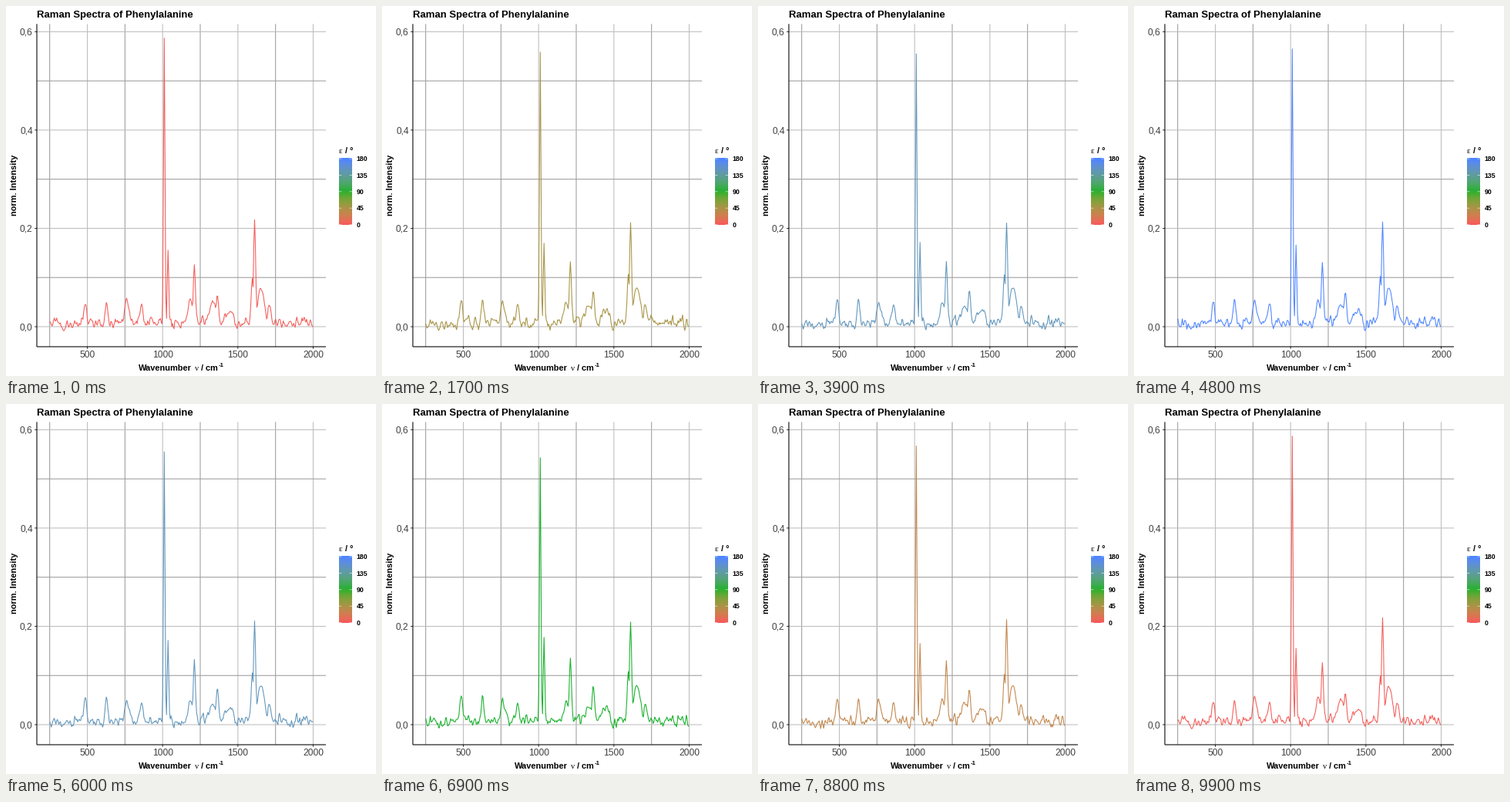
Write a matplotlib script that moves like this. It is 480 by 480 pixels and loops after 10 s.

```python
import numpy as np
import matplotlib.pyplot as plt
from matplotlib.animation import FuncAnimation

plt.rcParams["font.family"] = "Liberation Sans"

SIZE, DPI = 480, 72          # at 72 dpi one point is one pixel
FRAMES, INTERVAL = 100, 100
ANGLES = [0, 30, 45, 60, 90, 120, 150, 180]
LEFT, RIGHT, TOP, BOTTOM = 40, 415, 23.3, 442

# Main Raman bands: centre, width (1/cm), height at 90°, change towards 0°
BANDS = [
    (486, 9, .055, -.018),
    (628, 7, .058, -.010),
    (761, 15, .042, .008),
    (861, 9, .045, .004),
    (1011, 4.8, .543, .044),
    (1036, 5, .177, -.023),
    (1186, 16, .042, .006),
    (1211, 7, .134, -.009),
    (1335, 26, .036, .012),
    (1363, 9, .074, -.012),
    (1445, 24, .033, -.004),
    (1596, 8, .108, -.011),
    (1611, 7, .208, .009),
    (1652, 22, .080, -.004),
    (1708, 12, .032, .004),
]

# Colour scale, blended in Lab space
STOPS = ["#F35E5A", "#17B12B", "#5086FF"]
TO_XYZ = np.array([[.4124, .3576, .1805], [.2126, .7152, .0722], [.0193, .1192, .9505]])
WHITE = TO_XYZ.sum(axis=1)
TO_LAB = np.array([[0, 116, 0], [500, -500, 0], [0, 200, -200]])


def rgb_to_lab(hexa):
    c = np.array([int(hexa[i:i + 2], 16) for i in (1, 3, 5)]) / 255
    lin = np.where(c > .04045, ((c + .055) / 1.055) ** 2.4, c / 12.92)
    t = TO_XYZ @ lin / WHITE
    return TO_LAB @ np.where(t > .008856, np.cbrt(t), 7.787 * t + 16 / 116)


def lab_to_rgb(lab):
    f = np.linalg.solve(TO_LAB, lab)
    t = np.where(f > .2069, f ** 3, (f - 16 / 116) / 7.787)
    lin = np.clip(np.linalg.solve(TO_XYZ, t * WHITE), 0, 1)
    return np.clip(np.where(lin > .0031308, 1.055 * lin ** (1 / 2.4) - .055, 12.92 * lin), 0, 1)


LABS = np.array([rgb_to_lab(s) for s in STOPS])


def colour(angle):
    return lab_to_rgb(np.array([np.interp(angle, [0, 90, 180], ch) for ch in LABS.T]))


def px(wavenumber):
    return 7.83 + .19533 * wavenumber


def py(value):
    return 416 - 637.7 * value


def noise(seed, n):
    raw = np.random.default_rng(seed).normal(0, 1, n + 2)
    return np.convolve(raw, [.3, .8, .3], "valid")


WAVE = np.arange(251, 1999, 5)


def spectrum(angle):
    turn = abs(1 - angle / 90) ** 1.5 * (1 if angle < 90 else .5)
    bands = np.max([(h + d * turn) * np.exp(-.5 * ((WAVE - c) / w) ** 2)
                    for c, w, h, d in BANDS], axis=0)
    rough = .006 * noise(7, len(WAVE)) + .004 * noise(100 + angle, len(WAVE))
    return np.maximum(bands + (.008 + rough) * np.exp(-bands / .06), -.008)


CURVES = [py(spectrum(a)) for a in ANGLES]
COLOURS = [colour(a) for a in ANGLES]

fig = plt.figure(figsize=(SIZE / DPI, SIZE / DPI), dpi=DPI, facecolor="white")
ax = fig.add_axes([0, 0, 1, 1])
ax.axis("off")


def rule(xs, ys, col, lw=1.07, z=1):
    ax.plot(xs, ys, color=col, lw=lw, zorder=z, solid_capstyle="butt", snap=False)


def label(x, y, text, size, bold=True, **kw):
    ax.text(x, y, text, fontsize=size, fontweight="bold" if bold else "normal",
            va="baseline", **kw)


# Grid, ticks and tick labels
GRID = ["#9e9e9e", "#bebebe"]
for i, w in enumerate(range(250, 2001, 250)):
    x, major = px(w), i % 2
    rule([x, x], [TOP, BOTTOM], GRID[major])
    if major:
        rule([x, x], [BOTTOM, BOTTOM + 2.75], "#333333", z=3)
        label(x, 456, str(w), 12, False, ha="center", color="#404040")
for i in range(7):
    y, major = py(i / 10), (i + 1) % 2
    rule([LEFT, RIGHT], [y, y], GRID[major])
    if major:
        rule([LEFT - 2.75, LEFT], [y, y], "#333333", z=3)
        label(34.7, y + 4.3, f"0,{i}", 12, False, ha="right", color="#404040")
rule([LEFT, LEFT], [TOP, BOTTOM], "black", z=3)
rule([LEFT, RIGHT], [BOTTOM, BOTTOM], "black", z=3)

# Titles
label(40, 15, "Raman Spectra of Phenylalanine", 13.1)
label(14, 232.3, "norm. Intensity", 11, rotation=90, rotation_mode="anchor", ha="center")
label(172.3, 473, "Wavenumber", 11)
label(244.5, 473, "ν", 11, False, family="Liberation Serif")
label(253, 473, "/ cm", 11)
label(275.5, 467.6, "-1", 7.7)

# Colour bar
label(431.5, 191, "ε", 11, False, family="Liberation Serif")
label(439.5, 191, "/ °", 11)
ramp = np.array([[colour(a)] for a in np.linspace(180, 0, 20)])
ax.imshow(ramp, extent=(432, 449, 284, 197.7), aspect="auto", interpolation="bilinear", zorder=2)
for i in range(5):
    y = 283.6 - 21.4 * i
    for x in (432, 445.6):
        rule([x, x + 3.4], [y, y], "#ffffffb0", .8, 4)
    label(454.5, y + 3.2, str(45 * i), 8.8)

line, = ax.plot(px(WAVE), CURVES[0], lw=1.07, color=COLOURS[0], zorder=2.5,
                solid_joinstyle="round")
ax.set_xlim(0, SIZE)
ax.set_ylim(SIZE, 0)


def update(frame):
    step = min(frame, FRAMES - 1 - frame) + 1   # forward, then rewind
    k = min(step * len(ANGLES) // (FRAMES // 2), len(ANGLES) - 1)
    line.set_ydata(CURVES[k])
    line.set_color(COLOURS[k])
    return line,


anim = FuncAnimation(fig, update, frames=FRAMES, interval=INTERVAL, repeat=True,
                     repeat_delay=0, blit=False)
plt.show()
```
